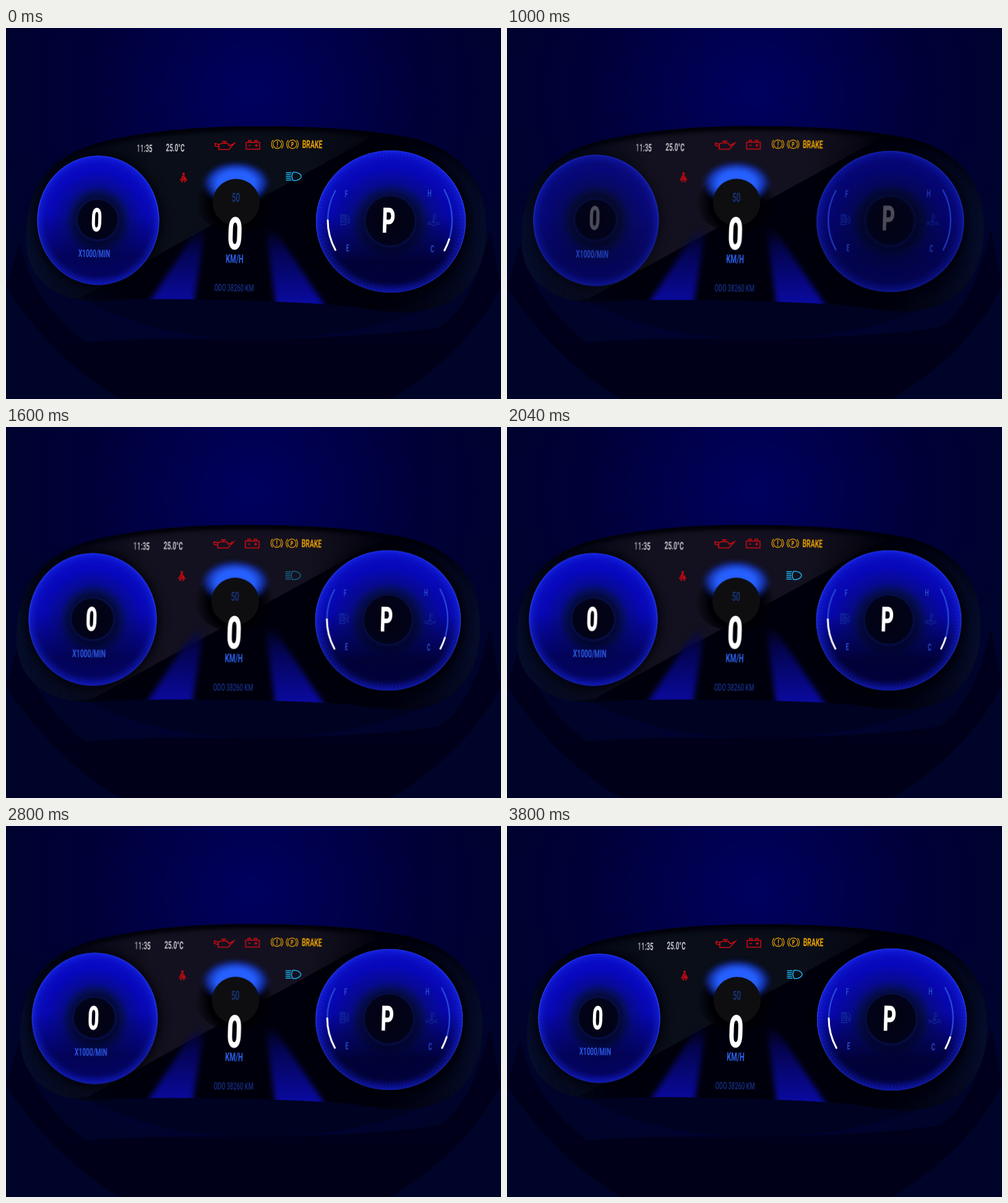
An HTML page with a canvas for the animation above (3.84 s loop, 800x600 px).

```html
<!DOCTYPE html>
<html lang="en">
<head>
<meta charset="utf-8">
<title>Instrument cluster</title>
<style>
  html, body { margin: 0; width: 100%; height: 100%; overflow: hidden; background: #000420; }
  #stage { position: relative; width: 800px; height: 600px; overflow: hidden; perspective: 800px; perspective-origin: 455px 300px; }
  #stage > * { position: absolute; left: 0; top: 0; }
  #cluster { transform-origin: 455px 300px; }
</style>
</head>
<body>
<div id="stage">
  <svg width="800" height="600">
    <defs>
      <radialGradient id="sky" gradientUnits="userSpaceOnUse" cx="400" cy="105" r="490">
        <stop offset="0" stop-color="#000060"/>
        <stop offset=".25" stop-color="#00004e"/>
        <stop offset=".55" stop-color="#000038"/>
        <stop offset="1" stop-color="#000428"/>
      </radialGradient>
      <linearGradient id="rim" x2="0" y2="1">
        <stop offset="0" stop-color="#00001e"/>
        <stop offset="1" stop-color="#000018"/>
      </linearGradient>
    </defs>
    <rect width="800" height="600" fill="url(#sky)"/>
    <path d="M0 420Q80 540 185 600H622Q740 530 800 420L782 325Q755 450 700 484Q600 500 400 503Q230 500 128 508Q40 440 22 345Z" fill="url(#rim)"/>
    <path d="M110 430Q230 503 400 503Q570 503 700 445Z" fill="#000222"/>
  </svg>
  <canvas id="cluster" width="800" height="600"></canvas>
</div>
<script>
const LOOP = 3840, TAU = Math.PI * 2, RAD = Math.PI / 180, CONDENSE = 0.58;
const canvas = document.getElementById('cluster');
const ctx = canvas.getContext('2d');
const outline = new Path2D('M32 335C34 255 75 202 165 182C240 165 320 159 410 159C510 159 590 165 650 177C730 193 774 245 776 315C779 385 748 440 685 455C650 463 610 459 570 452C510 443 300 437 190 439C155 443 125 443 100 435C55 420 30 385 32 335Z');

const ramp = (t, from, to) => {
  const x = Math.min(1, Math.max(0, (t - from) / (to - from)));
  return x * x * (3 - 2 * x);
};
const mix = (a, b, k) => `rgb(${a.map((v, i) => Math.round(v + (b[i] - v) * k))})`;

// The loop opens fully lit, cuts to dark, then the lights come on in turn.
const power = (t, from, to) => t < 40 ? 1 : ramp(t, from, to);

function layer(alpha, draw) {
  if (alpha <= 0) return;
  ctx.save();
  ctx.globalAlpha *= alpha;
  draw();
  ctx.restore();
}

function gradient(g, stops) {
  for (const [at, color] of stops) g.addColorStop(at, color);
  return g;
}
const linear = (x1, y1, x2, y2, ...stops) => gradient(ctx.createLinearGradient(x1, y1, x2, y2), stops);
const radial = (x, y, r, ...stops) => gradient(ctx.createRadialGradient(x, y, 0, x, y, r), stops);

function disc(x, y, rx, ry, fill) {
  ctx.beginPath();
  ctx.ellipse(x, y, rx, ry, 0, 0, TAU);
  ctx.fillStyle = fill;
  ctx.fill();
}

function text(str, x, y, size, color, weight = 700) {
  ctx.save();
  ctx.translate(x, y);
  ctx.transform(CONDENSE, 0.01, -0.03, 1, 0, 0);
  ctx.font = `${weight} ${size}px Roboto, sans-serif`;
  ctx.textAlign = 'center';
  ctx.fillStyle = color;
  ctx.fillText(str, 0, size * 0.356);
  ctx.restore();
}

function line(d, color, width = 1.5, x = 0, y = 0) {
  ctx.save();
  ctx.translate(x, y);
  ctx.strokeStyle = color;
  ctx.lineWidth = width;
  ctx.stroke(new Path2D(d));
  ctx.restore();
}

function arc(x, y, r, from, to, color, width) {
  ctx.beginPath();
  ctx.arc(x, y, r, from * RAD, to * RAD);
  ctx.strokeStyle = color;
  ctx.lineWidth = width;
  ctx.stroke();
}

function panel(sway) {
  ctx.fillStyle = '#00000c';
  ctx.fill(outline);
  ctx.save();
  ctx.clip(outline);

  const shift = 30 * sway;
  ctx.beginPath();
  [[120 + shift, 436], [585 + shift, 180], [585, 100], [0, 100], [0, 450]].forEach(p => ctx.lineTo(...p));
  const sheen = mix([9, 14, 24], [19, 17, 31], Math.min(1, sway * 5));
  ctx.fillStyle = linear(30, 0, 600, 0, [0, '#030718'], [0.35, sheen], [0.8, sheen], [1, '#05050f']);
  ctx.fill();

  ctx.filter = 'blur(12px)';
  ctx.lineWidth = 70;
  ctx.strokeStyle = linear(30, 0, 776, 0, [0, 'rgba(6,14,46,.9)'], [0.25, 'rgba(3,6,24,0)'], [0.75, 'rgba(3,6,24,0)'], [1, 'rgba(6,14,46,.9)']);
  ctx.stroke(outline);
  ctx.filter = 'blur(3px)';
  ctx.lineWidth = 14;
  ctx.strokeStyle = linear(0, 160, 0, 300, [0, '#000008'], [1, 'rgba(0,0,8,0)']);
  ctx.stroke(outline);
  ctx.restore();
}

function road(level) {
  layer(level, () => {
    ctx.clip(outline);
    ctx.filter = 'blur(4px)';
    ctx.fillStyle = linear(0, 325, 0, 445, [0, 'rgba(6,6,90,.05)'], [0.3, '#040452'], [1, '#0a0aa0']);
    ctx.fill(new Path2D('M309 325H322L302 452H226ZM420 325H433L520 456H437Z'));
  });
}

function halo(level, flare) {
  const core = mix([38, 96, 255], [40, 150, 255], flare);
  disc(371, 284, 64, 46, radial(371, 284, 64, [0, '#000004'], [0.65, '#000004'], [1, 'rgba(0,0,4,0)']));
  layer(level, () => {
    ctx.filter = 'blur(3px)';
    ctx.translate(372, 251);
    ctx.scale(56, 36);
    disc(0, 0, 1, 1, radial(0, 0, 1, [0, core], [0.55, core], [0.78, 'rgba(24,64,215,.75)'], [1, 'rgba(10,24,140,0)']));
  });
  disc(372, 282, 38, 38, '#0e0e11');
  layer(0.65 + 0.35 * flare, () => text('50', 371.5, 274, 20, '#1e50c8', 500));
}

function dial(x, y, rx, ry, hole, shade, level, size) {
  const dark = k => `rgba(0,0,32,${shade * k})`;
  layer(level, () => {
    ctx.save();
    ctx.filter = 'blur(8px)';
    disc(x, y, rx * size + 5, ry * size + 5, 'rgba(0,0,5,.85)');
    ctx.restore();

    ctx.save();
    ctx.translate(x, y);
    ctx.scale(rx * size, ry * size);
    disc(0, 0, 1, 1, radial(0, 0, 1, [0, '#03041c'], [0.34, '#050a38'], [0.44, '#061068'], [0.54, '#080ca4'], [0.78, '#0808d2'], [0.95, '#0c10d2'], [1, '#1426e4']));
    disc(0, 0, 1, 1, linear(0, -1, 0, 1, [0, dark(0.1)], [0.45, dark(0.25)], [0.6, dark(0.6)], [0.78, dark(1)], [0.92, dark(1)], [1, dark(0.75)]));
    disc(0, 0, 1, 1, radial(0, 0, 1, [0.86, 'rgba(14,24,220,0)'], [1, 'rgba(20,34,235,.5)']));

    ctx.globalAlpha *= 0.2;
    ctx.strokeStyle = '#3044ff';
    ctx.lineWidth = 0.008;
    ctx.beginPath();
    for (let a = 0; a < TAU; a += TAU / 120) {
      ctx.moveTo(0.92 * Math.cos(a), 0.92 * Math.sin(a));
      ctx.lineTo(0.98 * Math.cos(a), 0.98 * Math.sin(a));
    }
    ctx.stroke();
    ctx.restore();

    ctx.beginPath();
    ctx.ellipse(x, y, rx * size - 0.5, ry * size - 0.5, 0, 0, TAU);
    ctx.strokeStyle = linear(0, y - ry, 0, y + ry, [0, '#2030dc'], [0.4, '#2a40f0'], [1, '#121a90']);
    ctx.lineWidth = 1.2;
    ctx.stroke();
  });
  layer(0.25 + 0.75 * level, () => {
    disc(x - 1, y - 1, hole + 6, hole + 6, radial(x - 1, y - 1, hole + 6, [0.8, '#02031c'], [0.87, '#06104a'], [1, 'rgba(4,8,60,0)']));
    disc(x - 1, y - 1, hole, hole, radial(x - 1, y - 1, hole, [0, '#020210'], [1, '#02031a']));
  });
}

function gauges(level, fill) {
  layer(level, () => {
    const ink = '#2747c8', dim = '#12299a';
    ctx.lineCap = 'round';
    arc(619, 311, 99, 151, 209, '#2648d8', 2.4);
    arc(619, 311, 102, -29, 28.5, '#2648d8', 2.4);
    if (fill > 0) {
      arc(619, 311, 99, 151, 151 + 29 * fill, '#fff', 3);
      arc(619, 311, 102, 28.5 - 11 * fill, 28.5, '#fff', 3);
    }
    text('F', 550, 268, 16, ink);
    text('E', 552, 355.5, 16, ink);
    text('H', 684.5, 267, 16, ink);
    text('C', 689, 357, 16, ink);
    line('M-7 8V-8H1V8M-8 8H2M-5 -6H-1V-2H-5ZM-6 1H0M-6 4H0M2 -1H4V5Q6 8 7 4V-3L4 -7', dim, 1.3, 548, 310);
    line('M0 4V-9M0 -8H5M0 -5H5M0 -2H5M-2 2H2V5H-2ZM-10 5Q-7 2 -5 5M5 5Q7 2 10 5M-9 8Q-6 5 -3 8T3 8T9 8', dim, 1.2, 691, 310);
  });
}

function warnings() {
  const red = '#d00a12', amber = '#e8a000';
  text('11:35', 224, 194.5, 17, linear(-22, 0, 22, 0, [0, '#85858e'], [1, '#d0d0d4']));
  text('25.0°C', 273.5, 193.5, 17, '#c6c6cc');

  line('M-10 -2L-4 -4H5L8 0L16 -4L7 6H-9V-2L-15 -4V0L-9 2M0 -4V-7M-4 -7H4', red, 1.6, 353, 190.5);
  line('M-11 -4H11V7H-11ZM-7 -4V-7H-3V-4M3 -4V-7H7V-4M-7 1H-3M3 1H8M5.5 -1.5V3.5', red, 1.5, 399, 189);
  layer(0.9, () => {
    disc(287, 236, 2, 2.2, red);
    ctx.fillStyle = red;
    ctx.fill(new Path2D('M285 238.5H289L292 245H282ZM281 245H293V246.5H281ZM283.5 247H286V249.5H283.5ZM288 247H290.5V249.5H288Z'));
    line('M290 239L284 245', '#160006', 0.9);
  });

  for (const [x, sign] of [[438.5, '!'], [463, 'P']]) {
    arc(x, 188, 6.8, 0, 360, amber, 1.2);
    arc(x, 188, 9.5, -45, 45, amber, 1.2);
    arc(x, 188, 9.5, 135, 225, amber, 1.2);
    text(sign, x, 188, sign === '!' ? 14 : 11, amber, 900);
  }
  text('BRAKE', 495, 188, 18, amber);
}

function headlight() {
  const cyan = '#20b4ee';
  line('M0 -6H9M0 -3H8M0 0H8M0 3H8M0 6H9', cyan, 1.4, 452.5, 240);
  line('M0 -6.5Q-4 0 0 6.5C5 8 13 4 13 0S5 -8 0 -6.5Z', cyan, 1.5, 464, 240);
}

function render(t) {
  const sway = (1 - Math.cos(TAU * t / LOOP)) / 2;
  canvas.style.transform = `translateX(${-sway}px) rotateY(${4 * sway}deg)`;
  ctx.clearRect(0, 0, 800, 600);

  const center = power(t, 460, 780);
  const dials = power(t, 350, 1550);
  const size = 0.5 + 0.5 * power(t, 500, 900);
  const labels = power(t, 860, 1260);
  const scale = power(t, 700, 1150);
  const flare = ramp(t, 300, 600) * (1 - ramp(t, 640, 1000));

  panel(sway);
  road(power(t, 260, 620));
  halo(power(t, 200, 560), flare);

  layer(center, () => {
    text('0', 370, 332 - 5 * (1 - center), 73, '#fff', 900);
    text('KM/H', 369.5, 373 - 5 * (1 - center), 19, '#2a62ee');
  });
  layer(power(t, 200, 560), () => text('ODO 38260 KM', 368.5, 420, 16, '#152f86', 500));

  dial(149, 311, 98.5, 104.5, 32, 0.66, dials, size);
  dial(622, 313, 121, 115, 40, 0.86, dials, size);
  layer(labels, () => {
    text('0', 146.5, 310 - 4 * (1 - labels), 53, '#fff', 900);
    text('P', 618.5, 311 - 5 * (1 - labels), 57, '#fff', 900);
  });
  layer(scale, () => text('X1000/MIN', 142.5, 364.5, 17, '#2c58e4'));
  gauges(scale, power(t, 1050, 1500));
  layer(power(t, 80, 360), warnings);
  layer(power(t, 1400, 1800), headlight);
}

function tick() {
  render(performance.now() % LOOP);
  requestAnimationFrame(tick);
}
tick();
</script>
</body>
</html>
```
